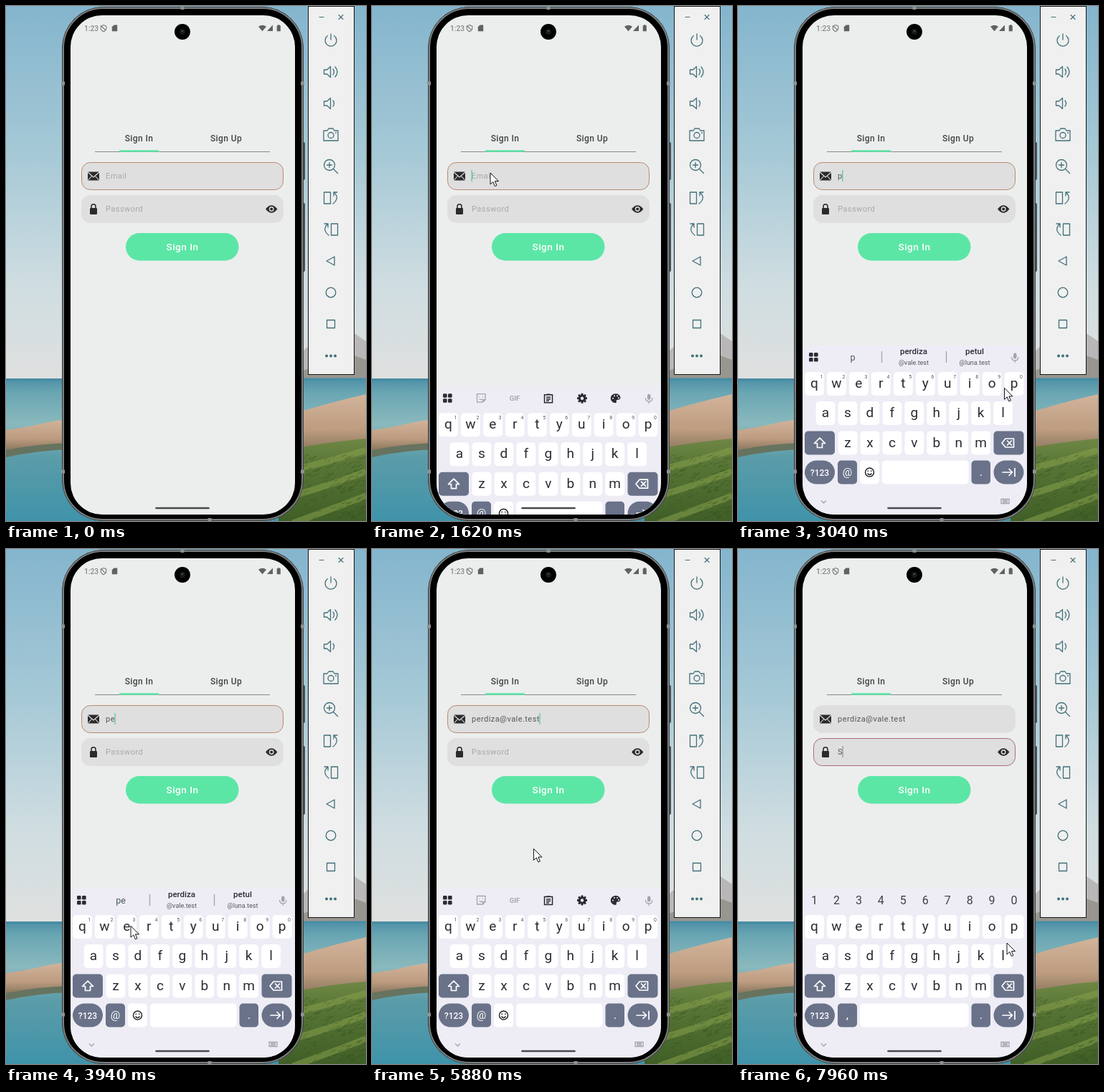
Animation, 502 px wide and 719 px high, one loop 8 s. Source, as an HTML page:

```html
<!DOCTYPE html>
<html lang="en">
<head>
<meta charset="utf-8">
<title>Sign in demo</title>
<style>
  html, body { margin: 0; width: 100%; height: 100%; overflow: hidden; }
  svg { display: block; width: 502px; height: 719px; font-family: Roboto, sans-serif; }
  .mid { text-anchor: middle; }
  .medium { font-weight: 500; }
  .field { font-size: 11px; letter-spacing: .45px; }
  .line { fill: none; stroke: #42707a; stroke-width: 1.3; stroke-linejoin: round; stroke-linecap: round; }
  .white { fill: none; stroke: #fff; stroke-width: 1.7; stroke-linejoin: round; stroke-linecap: round; }
  .dark { fill: none; stroke: #24262c; stroke-width: 1.5; }
  .pale { fill: none; stroke: #a3a4aa; stroke-width: 1.3; }
</style>
</head>
<body>
<svg viewBox="0 0 502 719">
  <defs>
    <linearGradient id="sky" x2="0" y2="1">
      <stop offset="0" stop-color="#84b5cd"/><stop offset=".4" stop-color="#a6c9d6"/>
      <stop offset=".75" stop-color="#cfdde1"/><stop offset="1" stop-color="#dfe0df"/>
    </linearGradient>
    <linearGradient id="lake" x2="0" y2="1">
      <stop offset="0" stop-color="#4d90a6"/><stop offset=".1" stop-color="#6aa6b3"/>
      <stop offset=".32" stop-color="#8ab9bd"/><stop offset=".55" stop-color="#5b9ca8"/><stop offset="1" stop-color="#3f93aa"/>
    </linearGradient>
    <linearGradient id="reed" x2="0" y2="1">
      <stop offset="0" stop-color="#d2b49b"/><stop offset=".6" stop-color="#bd9c80"/><stop offset="1" stop-color="#84735a"/>
    </linearGradient>
    <linearGradient id="grass" x2="0" y2="1">
      <stop offset="0" stop-color="#6f8745"/><stop offset=".35" stop-color="#567434"/><stop offset="1" stop-color="#405f27"/>
    </linearGradient>
    <clipPath id="screen"><rect x="90" y="13" width="313" height="697" rx="44"/></clipPath>
  </defs>

  <rect width="502" height="521" fill="url(#sky)"/>
  <path d="M380 521L418 478 445 460 480 453 502 468V521Z" fill="#b9b7b8"/>
  <path d="M380 521L425 505 480 486 502 494V521Z" fill="#98968f"/>
  <rect y="520" width="502" height="199" fill="url(#lake)"/>
  <path d="M0 522H78M414 521H502" stroke="#478da5" stroke-width="3"/>
  <path d="M0 592Q30 588 50 583T92 577V612Q50 612 0 622Z" fill="url(#reed)"/>
  <path d="M0 620Q45 611 92 610V619Q45 620 0 630Z" fill="#66735f"/>
  <path d="M380 576Q440 556 502 542V625H380Z" fill="url(#reed)"/>
  <path d="M380 622Q450 608 502 604V719H380Z" fill="url(#grass)"/>
  <path d="M400 648Q450 636 502 620M400 684Q455 668 502 650M400 722Q455 702 502 684" fill="none" stroke="#87a04c" stroke-opacity=".55" stroke-width="9"/>
  <path id="blades" fill="none" stroke="#2f4a1c" stroke-opacity=".45"/>

  <g>
    <rect x="412" y="190" width="5" height="53" rx="2" fill="#4b4f52"/>
    <rect x="412" y="275" width="5" height="96" rx="2" fill="#4b4f52"/>
    <rect x="78.500" y="1.500" width="336" height="717" rx="57" fill="#000" stroke="#3c3e40"/>
    <rect x="80" y="3" width="333" height="714" rx="55.500" fill="none" stroke="#7c7f81" stroke-width="2"/>
    <path d="M77 108H82M411 108H416M77 650H82M411 650H416M246 0V5M284 715V719" stroke="#8e9193" stroke-width="5"/>
    <rect x="90" y="13" width="313" height="697" rx="44" fill="#eceeee"/>
    <circle cx="246" cy="36" r="11"/><circle cx="246" cy="36" r="4" fill="#15191d"/><circle cx="246" cy="35" r="1.3" fill="#3d5147"/>
  </g>

  <g fill="#858788">
    <text x="109" y="34.5" font-size="10.2" class="medium">1:23</text>
    <path d="M136 26.5l3.8 1.5v3q0 3-3.8 4.7-3.8-1.7-3.8-4.7v-3zM133 28l6 6" fill="none" stroke="#77797a" stroke-width="1.1"/>
    <path d="M150.5 26.5h4.7v8.8h-7.4v-6z" fill="#5f6162"/>
    <path d="M352 28.8q5.500-4 11 0L357.500 35.300z" fill="#5f6162"/>
    <path d="M372 26.500v8.500h-8z" fill="#5f6162"/>
    <path d="M379 26.200h2.500v1h1.300v8h-5.100v-8h1.300z" fill="#5f6162"/>
  </g>

  <g class="mid medium" font-size="12" letter-spacing=".4" fill="#414344">
    <text x="185.5" y="189">Sign In</text><text x="307" y="189">Sign Up</text>
  </g>
  <path d="M124 203.500H368" stroke="#858788"/>
  <path d="M158 202.500H213" stroke="#5ce6a6" stroke-width="2.500"/>

  <rect id="emailBox" x="105.500" y="218.500" width="281" height="38" rx="12"/>
  <rect id="passBox" x="105.500" y="264.500" width="281" height="38" rx="12"/>
  <rect x="114" y="231.500" width="16" height="12" rx="1" fill="#292b2d"/>
  <path d="M114 232l8 7 8-7M114.500 243l5.500-6M129.500 243l-5.500-6" fill="none" stroke="#dfdfdf" stroke-width="1.100"/>
  <rect x="117" y="282" width="10" height="9" rx="1.200" fill="#292b2d"/>
  <path d="M119 283v-3.200a3 3 0 0 1 6 0v3.200" class="dark"/>
  <path d="M362 283.500q8.200-10.500 16.400 0-8.200 10.500-16.400 0z" fill="#292b2d"/>
  <circle cx="370.200" cy="283.500" r="3.400" fill="#dfdfdf"/><circle cx="370.200" cy="283.500" r="2" fill="#292b2d"/>
  <text id="email" class="field" x="139" y="241"/>
  <text id="pass" class="field" x="139" y="287"/>
  <rect id="caret" width="1.300" height="16"/>
  <rect x="167" y="317" width="157.500" height="38.500" rx="19.200" fill="#5ce6a6"/>
  <text x="246" y="341" class="mid medium" font-size="13.500" letter-spacing=".5" fill="#fff">Sign In</text>

  <g clip-path="url(#screen)"><g id="keyboard"></g></g>
  <path d="M209.500 701H282.500" stroke="#48494d" stroke-width="2.600" stroke-linecap="round"/>

  <rect x="421.500" y=".5" width="64" height="514" fill="#f0f0f0" stroke="#151515"/>
  <g class="line">
    <path d="M437 15.500h6M464 12.500l6 6m0-6l-6 6" stroke-width="1.100"/>
    <path d="M453 39v8M448.500 41.500a8 8 0 1 0 9 0"/>
    <path d="M443.500 89v6h4l5 4.500v-15l-5 4.500zM456 88q3 4 0 8M459 85q6 7 0 14"/>
    <path d="M443.500 133v6h4l5 4.500v-15l-5 4.500zM456 132q3 4 0 8"/>
    <path d="M443 174h5l2-3h6l2 3h5v14h-20z"/><circle cx="453" cy="180.500" r="4"/><path d="M459.500 177h1"/>
    <circle cx="451" cy="222" r="7.500"/><path d="M456.500 227.500l6 6M451 218.500v7M447.500 222h7"/>
    <path d="M443.500 260h9v16h-9zM456 276q10-8 1-16m5 0h-5v5"/>
    <path d="M453.500 304h9v16h-9zM450 320q-10-8-1-16m-5 0h5v5"/>
    <path d="M447 356l11-6v12z"/><circle cx="453" cy="400" r="6.800"/><path d="M447.500 438.500h11v11h-11z"/>
  </g>
  <path d="M447 488.500h.01M453 488.500h.01M459 488.500h.01" class="line" style="stroke-width:4"/>

  <path id="pointer" d="M0 0V16L3.800 12.500 6.300 18.600 8.900 17.500 6.400 11.600H11.500Z" fill="#fff" stroke="#111"/>
</svg>

<script>
const LOOP = 8000;
const ADDRESS = 'perdiza@vale.test';
const $ = id => document.getElementById(id);

// Keyboard
const KEY = '#fff', ACCENT = '#6a7289', INK = '#2b2c33';
const rect = (x, y, w, h, fill, r = 5, id = '') =>
  `<rect ${id && `id="${id}"`} x="${x}" y="${y}" width="${w}" height="${h}" rx="${r}" fill="${fill}"/>`;
const label = (x, y, text, size, fill = INK, cls = 'mid') =>
  `<text x="${x}" y="${y}" font-size="${size}" fill="${fill}" class="${cls}">${text}</text>`;
const path = (d, cls) => `<path d="${d}" class="${cls}"/>`;
const group = (id, ...parts) => `<g id="${id}">${parts.join('')}</g>`;
const separator = x => path(`M${x} 482v16`, 'pale');

const rows = [['qwertyuiop', 106.5, 511], ['asdfghjkl', 122, 552], ['zxcvbnm', 153, 593.5]];
const eachKey = draw => rows.map(([keys, x, y]) =>
  [...keys].map((k, i) => draw(k, x + i * 30.95, y)).join('')).join('');
const digits = draw => [...'1234567890'].map((d, i) => draw(d, 106.5 + i * 30.95)).join('');
const letters = convert => eachKey((k, x, y) => label(x, y + 22, convert(k), 19));

const gear = Array.from({length: 8}, (_, i) =>
  `<path d="M293 483.500v4" stroke="${INK}" stroke-width="2.800" transform="rotate(${i * 45} 293 490.500)"/>`).join('');

$('keyboard').innerHTML = [
  rect(88, 474, 317, 240, '#eeedf6', 0),
  eachKey((k, x, y) => rect(x - 13.4, y, 26.8, 33, KEY)),
  rect(93, 593.5, 42, 33, ACCENT, 5, 'shiftKey'), rect(356.5, 593.5, 42, 33, ACCENT),
  rect(93, 634.5, 42, 33, ACCENT, 16.5), rect(139, 634.5, 27, 33, ACCENT),
  rect(325.5, 634.5, 26.5, 33, ACCENT), rect(356.5, 634.5, 42, 33, ACCENT, 16.5),
  '<path id="shiftArrow" class="white" d="M114 603l-7.500 7.500h4v6h7v-6h4z"/>',
  path('M373 604h11.500v12h-11.500l-5-6zM375.500 607l6 6m0-6l-6 6', 'white'),
  path('M369 651h13M378 646.500l4.500 4.500-4.500 4.500M386 645.500v11', 'white'),
  label(114, 655.5, '?123', 12, '#fff', 'mid medium'), label(339, 656, '.', 17, '#fff'),
  path('M116 690.500l3.500 3.500 3.500-3.500', 'pale'), path('M367 688.500h11v6h-11zM369 690.500h7M369 692.500h7', 'pale'),
  group('lower', letters(k => k)), group('upper', letters(k => k.toUpperCase())),
  group('mailKeys',
    rect(170, 634.5, 27, 33, KEY), rect(201, 634.5, 120.5, 33, KEY), label(152.5, 656, '@', 15, '#fff'),
    '<circle cx="183.500" cy="651" r="6" class="dark"/>',
    path('M180.500 652.500q3 4 6 0M181.200 648.500v1.500M185.800 648.500v1.500', 'dark'),
    digits((d, x) => label(x + 10, 520, d, 7, '#55565e')),
    [[99, 484], [106, 484], [99, 491], [106, 491]].map(([x, y]) => rect(x, y, 5.6, 5.6, INK, 1.4)).join(''),
    rect(384, 484.5, 4.5, 8, '#a3a4aa', 2.2), path('M381.500 490q0 5 4.700 5t4.700-5M386.200 495v3', 'pale')),
  group('tools',
    path('M146.500 484.500h11.500v8l-3.500 3.500h-8zM154.500 496v-3.500h3.500M149.500 488v1M154.500 488v1M149.500 491.500q2.500 2 4 0', 'pale'),
    label(199, 494, 'GIF', 9.5, '#9b9ca3', 'mid medium'),
    path('M240.500 485.500h11v11h-11zM243.500 485h5M243 489h6M243 491.500h6M243 494h4', 'dark'),
    gear, `<circle cx="293" cy="490.500" r="3.800" fill="none" stroke="${INK}" stroke-width="3.200"/>`,
    `<path d="M339.500 484a6.800 6.500 0 0 0 0 13q2.300-.8 1-3 .2-1.500 2-1.500 4 0 4-3-.8-5.500-7-5.500z" fill="${INK}"/>`,
    [[336, 490.5], [338, 487], [342, 487], [344, 490]].map(([x, y]) => `<circle cx="${x}" cy="${y}" r="1" fill="#eeedf6"/>`).join('')),
  group('suggest',
    '<text id="typed" x="160" y="494.500" font-size="12.500" class="mid" fill="#46575a"/>', separator(200.5),
    label(245, 486, 'perdiza', 11.5, INK, 'mid medium'), label(245, 501, '@vale.test', 9, '#55565e')),
  group('second', separator(290.5),
    label(330, 486, 'petul', 11.5, INK, 'mid medium'), label(330, 501, '@luna.test', 9, '#55565e')),
  group('passKeys', rect(170, 634.5, 151.5, 33, KEY), label(152.5, 656, ',', 17, '#fff'),
    digits((d, x) => label(x, 496, d, 16, '#3f4047')))
].join('');

// Meadow
let seed = 7;
const random = () => (seed = seed * 16807 % 2147483647) / 2147483647;
$('blades').setAttribute('d', Array.from({length: 150}, () =>
  `M${410 + random() * 92} ${628 + random() * 91}l${3 + random() * 5} ${-1 - random() * 3}`).join(''));

// Pointer stops: time, x, y
const stops = [
  [250, 316, 657], [830, 165, 228], [1260, 165, 228], [1280, 165, 222], [1335, 165, 222], [1350, 165, 228],
  [1560, 165, 228], [1620, 165, 233], [2160, 424, 514], [2420, 424, 514], [2800, 384, 532], [2960, 384, 533],
  [3190, 340, 534], [3700, 174, 527], [4070, 174, 526], [4380, 199, 527], [4650, 199, 527],
  [5120, 245, 498], [5720, 245, 496], [6120, 190, 278], [6250, 190, 278], [6650, 101, 591], [6720, 106, 606],
  [6920, 106, 606], [7320, 152, 564], [7520, 152, 564], [7940, 375, 550], [8000, 375, 550]
];
const typing = [[0, ''], [2900, 'p'], [3850, 'pe'], [4500, 'per'], [5450, ADDRESS]];
const FOCUS_PASS = 6200, SHIFT = 6800, TYPE_S = 7480;
const caretResets = [330, 2900, 3850, 4500, 5450, FOCUS_PASS, TYPE_S];

const show = (id, on) => $(id).setAttribute('visibility', on ? 'visible' : 'hidden');
const attr = (id, values) => { for (const k in values) $(id).setAttribute(k, values[k]); };

function pointerAt(t) {
  const i = Math.max(1, stops.findIndex(s => s[0] > t));
  const [t0, x0, y0] = stops[i - 1], [t1, x1, y1] = stops[i];
  const p = (t - t0) / (t1 - t0), e = p * p * (3 - 2 * p);
  return [x0 + (x1 - x0) * e, y0 + (y1 - y0) * e];
}

function fill(id, text, hint) {
  $(id).textContent = text || hint;
  attr(id, {fill: text ? '#555758' : '#a8a9aa'});
}

function draw(t) {
  const email = typing.findLast(s => s[0] <= t)[1];
  const pass = t >= TYPE_S ? 'S' : '';
  const onPass = t >= FOCUS_PASS, upper = t >= SHIFT && t < TYPE_S;
  const suggesting = email && email !== ADDRESS;

  fill('email', email, 'Email');
  fill('pass', pass, 'Password');
  attr('emailBox', {fill: '#dfdfdf', stroke: onPass ? '#dfdfdf' : '#b98a70'});
  attr('passBox', {fill: '#dfdfdf', stroke: onPass ? '#ad6c74' : '#dfdfdf'});

  const active = onPass ? 'pass' : 'email', value = onPass ? pass : email;
  const width = value ? $(active).getComputedTextLength() : 0;
  const reset = caretResets.findLast(r => r <= t);
  show('caret', reset !== undefined && (t - reset) % 1000 < 500);
  attr('caret', {x: 138.5 + width, y: onPass ? 275 : 229, fill: onPass ? '#8d9894' : '#5fc79b'});

  const rise = Math.min(1, Math.max(0, (t - 1545) / 200));
  attr('keyboard', {transform: `translate(0 ${240 * (1 - rise) ** 3})`});
  const up = rise > 0;
  show('keyboard', up);
  show('lower', up && !upper);
  show('upper', upper);
  show('mailKeys', up && !onPass);
  show('passKeys', onPass);
  show('tools', up && !onPass && !suggesting);
  show('suggest', suggesting);
  show('second', suggesting && email !== 'per');
  $('typed').textContent = email;
  attr('shiftArrow', {style: upper ? 'fill:#fff' : ''});
  attr('shiftKey', {fill: t >= SHIFT && t < SHIFT + 120 ? '#575e73' : ACCENT});

  show('pointer', t >= 250);
  attr('pointer', {transform: `translate(${pointerAt(t)})`});
}

function frame() {
  draw(performance.now() % LOOP);
  requestAnimationFrame(frame);
}
frame();
</script>
</body>
</html>
```
